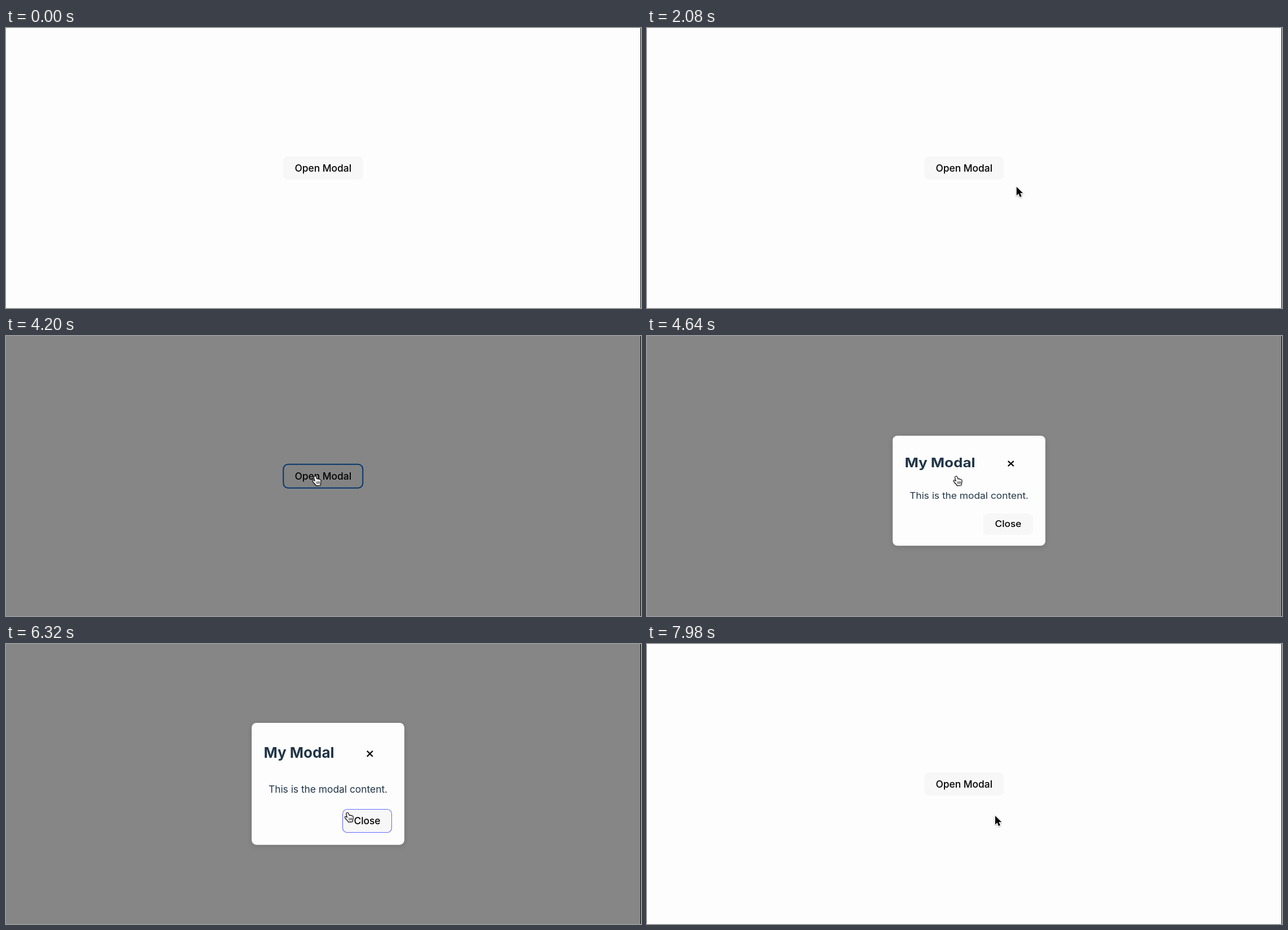
An HTML page with a canvas for the animation above (8000 ms loop, 1127 px wide and 497 px high).

```html
<!DOCTYPE html>
<html lang="en">
<head>
<meta charset="utf-8">
<title>Modal</title>
<style>
html, body { margin: 0; width: 100%; height: 100%; overflow: hidden; background: #fdfdfd; }
canvas { display: block; }
</style>
</head>
<body>
<canvas id="stage" width="1127" height="497"></canvas>
<script>
const ctx = document.getElementById('stage').getContext('2d');
const W = 1127, H = 497, LOOP = 8000;
const UNIT = 1.085; // stage pixels per CSS pixel
const PAGE = '#fdfdfd';
const MODAL = { x: 436, y: 140, w: 271, h: 216.5 };
const OPEN_BUTTON = { x: 492, y: 228, w: 141.5, h: 41.5, label: 'Open Modal' };
const CLOSE_BUTTON = { x: 597, y: 293, w: 88, h: 42, label: 'Close' };
const TIME = {
  enter: 1000, hoverOpen: 2700, pressOpen: 3760, show: 4040,
  leave: 5300, hoverClose: 6000, pressClose: 7120, hide: 7420, move: 7960
};

// Pointer tip: time, x, y
const POINTER = [
  [1000, 1112, 323], [1260, 972, 304], [1540, 830, 297], [1820, 716, 289],
  [2080, 656, 282], [2660, 590, 264], [2800, 548.5, 249], [5300, 548.5, 249],
  [5600, 566, 270], [6040, 599, 295], [6860, 619, 308], [7960, 619, 308],
  [7980, 618, 305]
];

// Modal drop: progress, offset, vertical scale, opacity
const DROP = [
  [0, -3000, 3, 0], [0.6, 25, 0.9, 1], [0.75, -10, 0.95, 1],
  [0.9, 5, 0.985, 1], [1, 0, 1, 1]
];

const ARROW = new Path2D('M0 0V15.4L3.6 12.1L6.1 18L8.9 16.8L6.4 11.1H11.2Z');
const HAND = new Path2D(
  'M4 1.2C5.2 .4 6.6 1 7 2.2L8.6 6C9.2 5.2 10.6 5.3 11 6.2C11.8 5.6 13 6 13.3 6.9' +
  'C14.2 6.5 15.3 7.1 15.4 8.3C15.6 10 15.4 11.5 14.8 13L14.2 17L7 17.6' +
  'C6 15.6 3.5 13.5 2 11.6L.6 9.4C0 8.2 1.5 7.2 3 8.2L4.7 9.6L3 3.4C2.8 2.4 3.2 1.6 4 1.2Z');
const FINGERS = new Path2D('M7.9 10.7L8.4 14.4M10.3 10.4L10.6 14.2M12.7 10.2V13.9');

const clamp = v => Math.max(0, Math.min(1, v));
const easeOut = v => 1 - (1 - v) ** 3;
const linear = v => v;
const within = (t, a, b) => t >= a && t < b;

function sample(keys, t, ease) {
  if (t <= keys[0][0]) return keys[0].slice(1);
  const i = keys.findIndex(key => key[0] > t);
  if (i < 0) return keys[keys.length - 1].slice(1);
  const a = keys[i - 1], b = keys[i];
  const p = ease((t - a[0]) / (b[0] - a[0]));
  return a.slice(1).map((v, k) => v + (b[k + 1] - v) * p);
}

function roundRect(x, y, w, h, r) {
  ctx.beginPath();
  ctx.roundRect(x, y, w, h, r);
}

function text(str, x, y, size, weight, color, align) {
  ctx.font = `${weight} ${size}px Inter, sans-serif`;
  ctx.fillStyle = color;
  ctx.textAlign = align;
  ctx.fillText(str, x, y);
}

function drawButton({ x, y, w, h, label }, hover, focused) {
  roundRect(x, y, w, h, 8.5);
  ctx.fillStyle = '#f7f7f7';
  ctx.fill();
  if (hover > 0 && !focused) {
    ctx.save();
    ctx.globalAlpha *= hover;
    roundRect(x + 0.5, y + 0.5, w - 1, h - 1, 8);
    ctx.strokeStyle = '#646cff';
    ctx.lineWidth = UNIT;
    ctx.stroke();
    ctx.restore();
  }
  if (focused) {
    roundRect(x + 0.2, y - 0.2, w - 0.4, h + 0.4, 8.5);
    ctx.strokeStyle = '#0b68cf';
    ctx.lineWidth = 2;
    ctx.stroke();
  }
  text(label, x + w / 2, y + h / 2 + 6.2, 16 * UNIT, 500, '#000', 'center');
}

function drawModal(t) {
  const [offset, scale, opacity] = sample(DROP, (t - TIME.show) / 1000, easeOut);
  const { x, y, w, h } = MODAL, middle = y + h / 2;
  ctx.save();
  ctx.globalAlpha = opacity;
  ctx.translate(0, middle + offset * UNIT);
  ctx.scale(1, scale);
  ctx.translate(0, -middle);

  ctx.save();
  ctx.shadowColor = 'rgba(0,0,0,.14)';
  ctx.shadowBlur = 10;
  ctx.shadowOffsetY = 2;
  roundRect(x, y, w, h, 8.5);
  ctx.fillStyle = PAGE;
  ctx.fill();
  ctx.restore();

  text('My Modal', 457.5, 202, 24 * UNIT, 700, '#213547', 'left');
  text('This is the modal content.', x + w / 2, 264.3, 16 * UNIT, 400, '#213547', 'center');
  ctx.beginPath();
  ctx.moveTo(640.8, 189.8);
  ctx.lineTo(650.8, 199.8);
  ctx.moveTo(650.8, 189.8);
  ctx.lineTo(640.8, 199.8);
  ctx.strokeStyle = '#000';
  ctx.lineWidth = 2.3;
  ctx.stroke();
  drawButton(CLOSE_BUTTON, clamp((t - TIME.hoverClose) / 250), t >= TIME.pressClose);
  ctx.restore();
}

function drawPointer(t) {
  const [x, y] = sample(POINTER, t, linear);
  const hand = within(t, TIME.hoverOpen - 60, TIME.leave) || within(t, TIME.hoverClose, TIME.move);
  ctx.save();
  ctx.lineJoin = ctx.lineCap = 'round';
  ctx.shadowColor = 'rgba(0,0,0,.35)';
  ctx.shadowBlur = 3;
  ctx.shadowOffsetY = 1;
  if (hand) {
    ctx.translate(x - 5, y - 1);
    ctx.fillStyle = '#fff';
    ctx.fill(HAND);
    ctx.shadowColor = 'transparent';
    ctx.strokeStyle = '#111';
    ctx.lineWidth = 1.2;
    ctx.stroke(HAND);
    ctx.lineWidth = 1;
    ctx.stroke(FINGERS);
  } else {
    ctx.translate(x, y);
    ctx.strokeStyle = '#fff';
    ctx.lineWidth = 1.8;
    ctx.stroke(ARROW);
    ctx.shadowColor = 'transparent';
    ctx.fillStyle = '#000';
    ctx.fill(ARROW);
  }
  ctx.restore();
}

function draw(t) {
  ctx.fillStyle = PAGE;
  ctx.fillRect(0, 0, W, H);
  const hover = t < TIME.leave ? clamp((t - TIME.hoverOpen) / 300) : 0;
  drawButton(OPEN_BUTTON, hover, within(t, TIME.pressOpen, TIME.pressClose));
  if (within(t, TIME.show, TIME.hide)) {
    ctx.fillStyle = 'rgba(0,0,0,.47)';
    ctx.fillRect(0, 0, W, H);
    drawModal(t);
  }
  if (t >= TIME.enter) drawPointer(t);
  ctx.fillStyle = '#000';
  ctx.fillRect(1126, 0, 1, H);
}

const start = performance.now();
function frame() {
  draw((performance.now() - start) % LOOP);
  requestAnimationFrame(frame);
}
frame();
</script>
</body>
</html>
```
